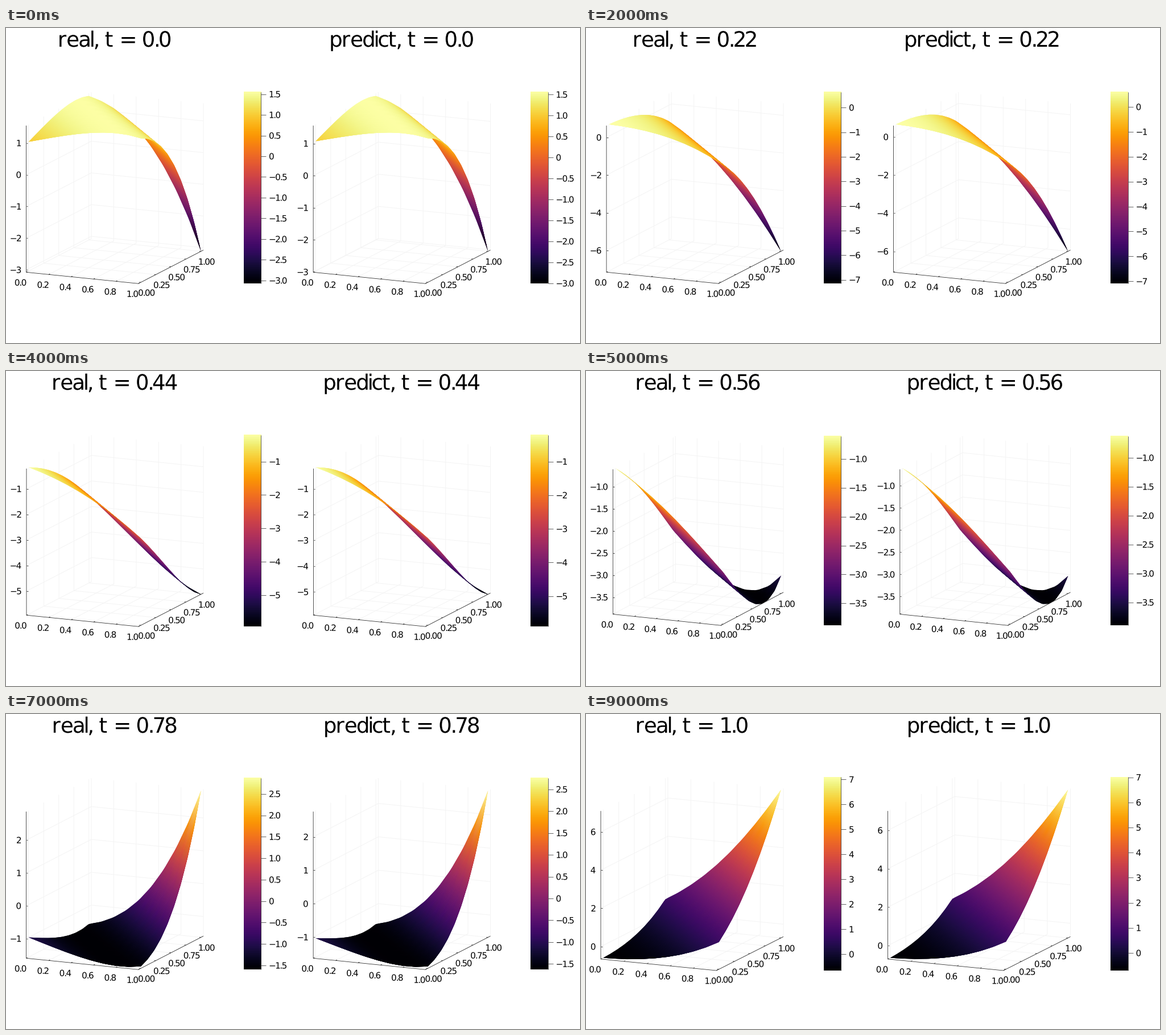
Recreate the animation shown at these times as a matplotlib script. Size 1009 px wide and 555 px high, loop 10 s.

```python
import matplotlib.pyplot as plt
import numpy as np
from matplotlib.animation import FuncAnimation
from matplotlib.collections import LineCollection, PolyCollection
from matplotlib.patches import PathPatch
from matplotlib.path import Path
from matplotlib.textpath import TextPath
from matplotlib.transforms import Affine2D

W, H, DPI = 1009, 555, 100
FRAMES = 10
PX = 72 / DPI
RIGHT = 347          # right end of the 3D box
PANEL_DX = 504.5     # distance between the two panels
TICK, TITLE = 15.2, 37.4
CMAP = plt.get_cmap("inferno")

N, SUB = 10, 6
GRID = np.linspace(0, 1, N)
FINE = np.linspace(0, 1, (N - 1) * SUB + 1)
BLEND = np.array([np.interp(FINE, GRID, row) for row in np.eye(N)]).T
S = GRID[:, None] + GRID[None, :]

# Network error over time at x + y = 0, 1 and 2
ERR_T = np.array([0, 2, 4, 6, 7, 8, 9]) / 9
ERR_0 = [.035, -.037, -.008, -.035, -.068, -.05, -.046]
ERR_1 = [.01, 0, .015, -.03, -.035, -.03, -.03]
ERR_2 = [.068, .064, .04, -.083, -.11, -.108, -.085]

fig = plt.figure(figsize=((W + .01) / DPI, (H + .01) / DPI), dpi=DPI, facecolor="white")
ax = fig.add_axes([0, 0, 1, 1])
glyphs = {}


def exact(t):
    return np.exp(S) * np.cos(S + 4 * t)


def predicted(t):
    e0, e1, e2 = (np.interp(t, ERR_T, e) for e in (ERR_0, ERR_1, ERR_2))
    error = e0 * (S - 1) * (S - 2) / 2 + e1 * S * (2 - S) + e2 * S * (S - 1) / 2
    return exact(t) + error


def glyph(c):
    """Outline at size 1 and its advance: the pen stops at the ink's right edge."""
    if c not in glyphs:
        if c == " ":
            glyphs[c] = None, .318
        else:
            path = TextPath((0, 0), c, size=1, prop={"family": "DejaVu Sans"})
            glyphs[c] = path, path.get_extents().x1
    return glyphs[c]


def text(x, y, s, size, align="left", base=None):
    """Draw s with its digits centred on y, or on the baseline if given."""
    pen, parts = 0, []
    for c in s:
        path, advance = glyph(c)
        if path is not None:
            parts.append((path, pen))
        pen += advance
    ink = glyph(s[0])[0].get_extents().x0
    if align == "center":
        x -= (pen + ink) / 2 * size
    elif align == "right":
        x -= pen * size
    if base is None:
        base = y + .364 * size
    outline = [p.transformed(Affine2D().translate(dx, 0).scale(size, -size).translate(x, base))
               for p, dx in parts]
    ax.add_patch(PathPatch(Path.make_compound_path(*outline), fc="black", lw=0, zorder=5))


def lines(segments, color, width, z):
    ax.add_collection(LineCollection(segments, colors=color, linewidths=width * PX, zorder=z))


def ticks(lo, hi, step):
    return [k * step for k in range(int(np.ceil(lo / step)), int(np.floor(hi / step)) + 1)]


def label(v, step):
    if v == 0:
        return "0"
    digits = 0 if step >= 1 else 1 if step == .5 else 2
    return f"{v:.{digits}f}".replace("-", "\u2212")


def z_step(span):
    return .5 if span < 4 else 1 if span < 7 else 2


def bar_step(span):
    return .25 if span < 2.8 else .5 if span < 5 else 1


def left_edge(labels):
    n = max(map(len, labels))
    if n == 1:
        return 26
    if n == 2:
        return 36 if "\u22124" in labels else 35.6
    return 47.3


def y_frac(y):
    return .037 + .926 * y


def surface(pts, rgb):
    """Paint cells back to front; each reaches under its nearer neighbours to hide seams."""
    n = len(FINE) - 1
    i, j = np.arange(n), np.arange(n, 0, -1)[:, None]
    i2, j2 = np.minimum(i + 2, n), np.maximum(j - 2, 0)
    quads = np.stack([pts[i, j], pts[i2, j], pts[i2, j2], pts[i, j2]], 2)
    tint = (rgb[i, j] + rgb[i + 1, j] + rgb[i + 1, j - 1] + rgb[i, j - 1]) / 4
    ax.add_collection(PolyCollection(quads.reshape(-1, 4, 2),
                                     facecolors=np.clip(tint.reshape(-1, 3), 0, 1),
                                     edgecolors="none", zorder=3))


def panel(dx, title, z):
    lo, hi = z.min(), z.max()
    step = z_step(hi - lo)
    marks = ticks(lo, hi, step)
    names = [label(v, step) for v in marks]
    left = left_edge(names)
    top = 111.2 + .175 * (left - 26)
    bottom = 452 - .175 * (left - 26)
    w, h = RIGHT - left, bottom - top

    def proj(fx, fy, fz):
        px = dx + left + w * (.633 * fx + .367 * fy)
        py = bottom + h * (-.0593 + .0593 * fx - .175 * fy - .7657 * fz)
        return np.stack(np.broadcast_arrays(px, py), -1)

    def level(v):
        return (v - lo) / (hi - lo)

    def route(*points):
        return np.array([proj(*p) for p in points])

    xs = np.arange(6) / 5
    ys = np.arange(5) / 4
    grid = [route((x, 0, 0), (x, 1, 0), (x, 1, 1)) for x in xs]
    grid += [route((1, y_frac(y), 0), (0, y_frac(y), 0), (0, y_frac(y), 1)) for y in ys]
    grid += [route((0, 0, level(v)), (0, 1, level(v)), (1, 1, level(v))) for v in marks]
    lines(grid, "0.955", 1, 1)

    axes = [route((0, 0, 1), (0, 0, 0), (1, 0, 0), (1, 1, 0))]
    axes += [route((x, 0, 0), (x, .02, 0)) for x in xs]
    axes += [route((1, y_frac(y), 0), (.986, y_frac(y), 0)) for y in ys]
    for v in marks:
        p = proj(0, 0, level(v))
        axes.append([p, p + (2.5, 0)])
    lines(axes, "0.15", .8, 2)

    zf = BLEND @ z @ BLEND.T
    rgb = np.einsum("ia,jb,abc->ijc", BLEND, BLEND, CMAP(level(z))[..., :3])
    surface(proj(FINE[:, None], y_frac(FINE)[None, :], level(zf)), rgb)

    for x in xs:
        px, py = proj(x, 0, 0)
        text(px - 10, py + 18, f"{x:.1f}", TICK, "center")
    for y in ys:
        px, py = proj(1, y_frac(y), 0)
        text(px + 10.2, py + 18.1, f"{y:.2f}", TICK, "center")
    for v, name in zip(marks, names):
        px, py = proj(0, 0, level(v))
        text(px - 9.5, py, name, TICK, "right")
    text(dx + (left + RIGHT) / 2 + .3, 0, title, TITLE, "center", base=33)

    # Colour bar
    x0, x1 = dx + 417.6, dx + 448
    ramp = CMAP(np.linspace(1, 0, 256))[:, None]
    ax.imshow(ramp, extent=(x0, x1, bottom, top), aspect="auto",
              interpolation="nearest", zorder=2)
    step = bar_step(hi - lo)
    rule = [[(x1, top), (x1, bottom)]]
    for v in ticks(lo, hi, step):
        y = bottom - level(v) * h
        rule.append([(x1, y), (x1 + 9, y)])
        text(dx + 462, y, label(v, step), TICK)
    lines(rule, "0.25", .8, 4)


def draw(i):
    t = i / (FRAMES - 1)
    ax.clear()
    ax.axis("off")
    panel(0, f"real, t = {round(t, 2)}", exact(t))
    panel(PANEL_DX, f"predict, t = {round(t, 2)}", predicted(t))
    ax.set_xlim(0, W)
    ax.set_ylim(H, 0)
    return []


anim = FuncAnimation(fig, draw, frames=FRAMES, interval=1000, repeat=True, repeat_delay=0)
plt.show()
```
